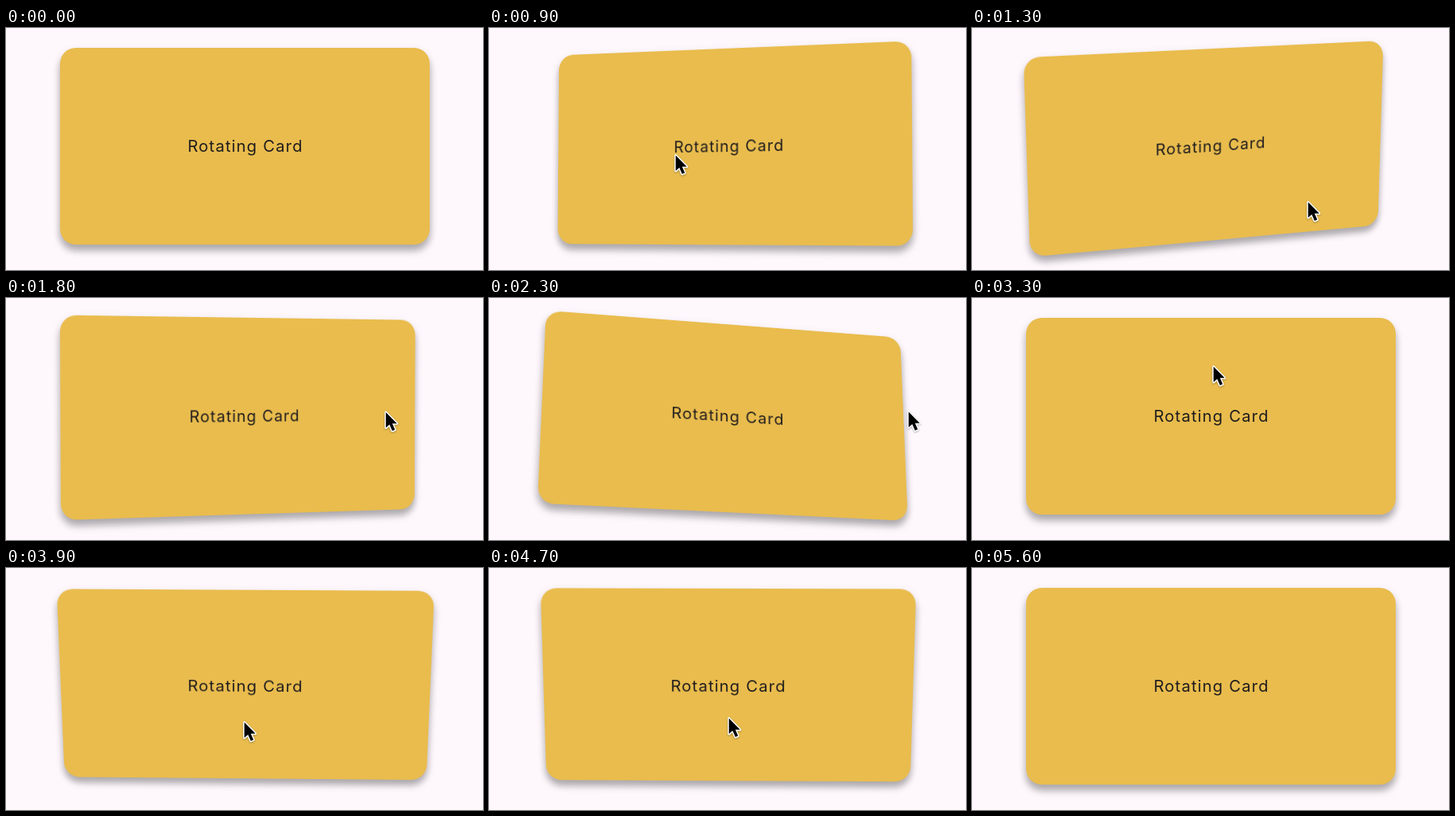
An HTML page for the animation above (5700 ms loop, 600x305 px).

```html
<!DOCTYPE html>
<html lang="en">
<head>
<meta charset="utf-8">
<title>Rotating Card</title>
<style>
  html, body { margin: 0; width: 100%; height: 100%; overflow: hidden; background: #fef8fd; }
  #stage { position: relative; width: 600px; height: 305px; overflow: hidden; }
  #card {
    position: absolute; left: 68px; top: 25.2px; width: 465px; height: 248px;
    display: flex; align-items: center; justify-content: center;
    border-radius: 20px; background: #e9bc4d;
    box-shadow: 0 8px 10px rgba(0, 0, 0, .26), 0 4px 12px rgba(0, 0, 0, .12);
    font: 20.3px/24px Inter, Roboto, sans-serif; letter-spacing: 1.13px;
    text-indent: 1.13px; color: #1f1c1e;
  }
  #cursor {
    position: absolute; left: 0; top: 0; overflow: visible;
    filter: drop-shadow(0 1px 1px rgba(0, 0, 0, .3));
  }
</style>
</head>
<body>
<div id="stage">
  <div id="card"><span>Rotating Card</span></div>
  <svg id="cursor" width="18" height="30">
    <path d="M.8 1.5V21L5.4 17L8.9 25L12.3 23.6L8.9 15.8H14.8Z" fill="#000" stroke="#fff"
      stroke-width="3" stroke-linejoin="round" paint-order="stroke"/>
  </svg>
</div>
<script>
const LOOP = 5700, STEP = 100, DEPTH = 1640;
const FULL = .3; // steepest tilt, radians

// key poses: time, then tilt about x and y as shares of FULL
const tilt = [
  [150, 0, 0], [450, .67, .25], [900, -.19, 1], [1300, .76, -1], [1500, .97, -1],
  [2150, -1, -.95], [2300, -1.01, -.69], [3000, 0, 0],
  [3300, 0, 0], [3800, .98, .08], [4300, .93, .07], [5600, 0, 0]
];

// pointer visits: time, then the tip
const visits = [
  [[100, 262, 284], [700, 165, 150], [900, 234, 159], [1300, 422, 218],
   [1600, 474, 200], [2000, 480, 85], [2300, 527, 142]],
  [[3300, 303, 85], [3900, 299, 193], [4700, 301, 188]]
];

const card = document.getElementById('card');
const cursor = document.getElementById('cursor');
const smooth = p => p * p * (3 - 2 * p);

function sample(keys, t) {
  const next = keys.findIndex(key => key[0] >= t);
  if (next < 0) return keys.at(-1).slice(1);
  const b = keys[next], a = keys[next - 1] || b;
  const p = a === b ? 0 : smooth((t - a[0]) / (b[0] - a[0]));
  return [1, 2].map(n => a[n] + (b[n] - a[n]) * p);
}

function draw(t) {
  const [rx, ry] = sample(tilt, t).map(share => -share * FULL);
  card.style.transform = `perspective(${DEPTH}px) rotateX(${rx}rad) rotateY(${ry}rad)`;

  const path = visits.find(v => t >= v[0][0] && t <= v.at(-1)[0]);
  cursor.style.visibility = path ? 'visible' : 'hidden';
  if (path) {
    const [x, y] = sample(path, t);
    cursor.style.transform = `translate(${x}px, ${y}px)`;
  }
}

const start = performance.now();
function tick() {
  const t = (performance.now() - start) % LOOP;
  draw(Math.floor(t / STEP) * STEP);
  requestAnimationFrame(tick);
}
tick();
</script>
</body>
</html>
```
